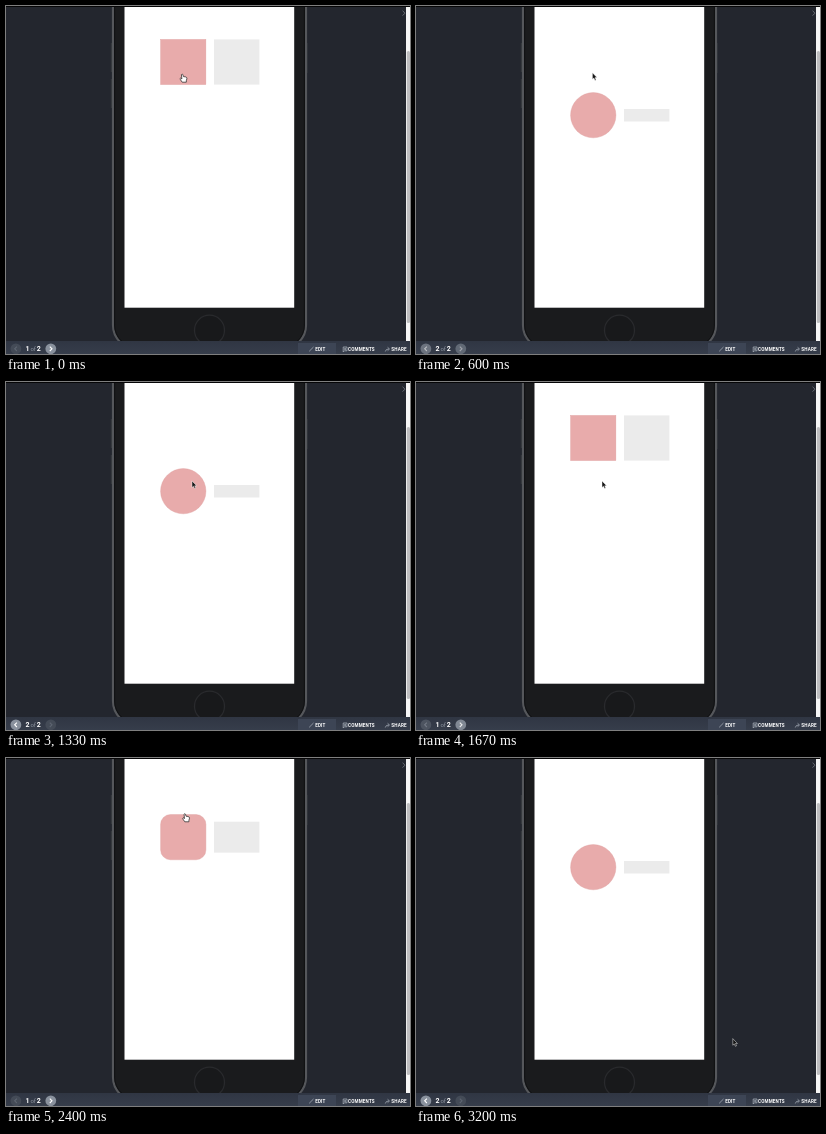
An HTML page for the animation above (3.27 s loop, 404 px wide and 348 px high).

```html
<!DOCTYPE html>
<html lang="en">
<head>
<meta charset="utf-8">
<title>Prototype preview</title>
<style>
  html, body { margin: 0; width: 100%; height: 100%; overflow: hidden; background: #23262e; }
  svg { display: block; width: 100%; height: 100%; }
  text { font-family: Roboto, Arial, sans-serif; font-weight: 700; fill: #fff; }
  .label { font-size: 4.6px; letter-spacing: .15px; }
  .count { font-size: 7px; }
  .icon { fill: none; stroke: #b4bac4; stroke-width: .7; }
</style>
</head>
<body>
<svg viewBox="0 0 404 348">
  <defs>
    <linearGradient id="barFill" x2="0" y2="1">
      <stop offset="0" stop-color="#303643"/>
      <stop offset="1" stop-color="#363d4b"/>
    </linearGradient>
  </defs>
  <rect width="404" height="348" fill="#23262e"/>

  <!-- phone -->
  <g fill="#34373c">
    <rect x="104.8" y="37" width="2" height="29"/>
    <rect x="104.8" y="73" width="2" height="29"/>
    <rect x="300" y="37" width="1.6" height="30"/>
  </g>
  <rect x="107" y="-60" width="193" height="403" rx="24" fill="#1a1b1d" stroke="#55575b" stroke-width="2.2"/>
  <rect x="108.6" y="-60" width="189.8" height="401.4" rx="22.5" fill="none" stroke="#101113"/>
  <rect x="118.5" y="0" width="169.7" height="301.7" fill="#fff"/>
  <circle cx="203.5" cy="324.2" r="15" fill="#18191b" stroke="#292a2d" stroke-width="1.3"/>

  <!-- design -->
  <rect id="pink" x="154.6" width="45.3" height="45.2" fill="#e8abab" stroke="#dfa0a0" stroke-width=".4"/>
  <rect id="grey" x="208" width="45.4" fill="#ebebeb"/>

  <!-- window edges -->
  <rect x="400" width="4" height="335" fill="#f6f6f6"/>
  <rect x="400.8" y="45" width="3.2" height="272" rx="1.5" fill="#bdbdbf"/>
  <path d="M396.6 4.8L399 7.2L396.6 9.6" fill="none" stroke="#71757d" stroke-width=".9"/>
  <rect width="404" height="1" fill="#050506"/>

  <!-- toolbar -->
  <rect y="335" width="404" height="13" fill="url(#barFill)"/>
  <rect x="292" y="337" width="38" height="11" fill="#3d4555"/>
  <g id="prev" transform="translate(9.9 342.8)">
    <circle r="5.4"/><path d="M1 -2.2L-1.2 0L1 2.2" fill="none" stroke-width="1.1"/>
  </g>
  <g id="next" transform="translate(44.8 342.8)">
    <circle r="5.4"/><path d="M-1 -2.2L1.2 0L-1 2.2" fill="none" stroke-width="1.1"/>
  </g>
  <text id="page" class="count" x="19.4" y="345.2">1</text>
  <text x="24.4" y="345.2" style="font-size:6px;font-weight:400;fill:#8b929e">of</text>
  <text class="count" x="30.8" y="345.2">2</text>
  <g class="icon">
    <path d="M303.2 345.3L307.5 341"/>
    <path d="M337.2 341H341V344.8H338.4L337.2 346ZM338.2 342.4H340M338.2 343.6H340"/>
    <path d="M379.3 345.5Q379.8 343 382.6 343M381.6 341.3L383.5 343L381.6 344.7"/>
  </g>
  <text class="label" x="309.2" y="345">EDIT</text>
  <text class="label" x="342" y="345">COMMENTS</text>
  <text class="label" x="385.3" y="345">SHARE</text>

  <!-- cursor -->
  <g id="cursor" stroke-linejoin="round">
    <path id="arrow" d="M.4 .3V6.9L1.9 5.6L3 8L4.1 7.5L3.1 5.2H5Z" fill="#151515" stroke="#fff" stroke-opacity=".75" stroke-width=".6"/>
    <path id="hand" d="M-.6 1.2Q.2 .3 .9 1.2L1.4 3.2L3.6 3.5Q5 3.9 4.9 5.2L4.3 7.4V8.8H.2L-1.6 6.2Q-2.4 4.9 -1.5 4.7L-.1 5.5Z" fill="#fff" stroke="#2a2a2a" stroke-width=".75"/>
  </g>
</svg>
<script>
const LOOP = 3270, TICK = 200 / 3, MORPH = 300, FADE = 340;

// pointer stops: time, x, y
const stops = [
  [0, 176, 67.4], [133, 176, 66.4], [1000, 176, 66.4], [1333, 185.6, 98.6],
  [1667, 185.6, 98.6], [2140, 178.6, 55], [2734, 178.6, 55], [3067, 306.6, 207], [3200, 316.4, 280.3]
];
// page changes: time, page
const pages = [[-FADE, 1], [515, 2], [1500, 1], [2567, 2]];

const $ = id => document.getElementById(id);
const set = (el, attrs) => { for (const k in attrs) el.setAttribute(k, attrs[k]); };
const clamp = v => Math.max(0, Math.min(1, v));
const mix = (a, b, p) => a + (b - a) * p;
const smooth = u => u * u * (3 - 2 * u);
const easeOut = u => 1 - (1 - u) ** 3;
const blend = (a, b, p) => `rgb(${a.map((v, i) => Math.round(mix(v, b[i], p)))})`;

function pointer(t) {
  const i = stops.findIndex(s => s[0] > t);
  if (i < 0) return stops[stops.length - 1].slice(1);
  const [a, b] = [stops[i - 1], stops[i]];
  const p = (t - a[0]) / (b[0] - a[0]);
  return [mix(a[1], b[1], p), mix(a[2], b[2], p)];
}

function button(el, p) {
  el.children[0].setAttribute('fill', blend([68, 75, 87], [137, 145, 157], p));
  el.children[1].setAttribute('stroke', blend([94, 101, 113], [255, 255, 255], p));
}

function draw(time) {
  const t = Math.min(48, Math.floor((time + 4) / TICK)) * TICK;

  // the way back is a hard cut
  const start = t < 1520 ? 235 : 2263;
  const m = smooth(clamp((t - start) / MORPH));
  const top = mix(33.4, 86.6, m);
  set($('pink'), { y: top, rx: 22.65 * m });
  set($('grey'), { y: mix(33.4, 103, m), height: mix(45.2, 12.5, m) });

  const [since, page] = pages.filter(p => p[0] <= t).pop();
  const f = easeOut(clamp((t - since) / FADE));
  const second = page === 2 ? f : 1 - f;
  $('page').textContent = page;
  button($('prev'), second);
  button($('next'), 1 - second);

  const [x, y] = pointer(t);
  const hover = page === 1 && y > top - 5 && y < top + 45;
  set($('cursor'), { transform: `translate(${x} ${y})` });
  set($('hand'), { visibility: hover ? 'visible' : 'hidden' });
  set($('arrow'), { visibility: hover ? 'hidden' : 'visible' });
}

const began = performance.now();
function tick() {
  draw((performance.now() - began) % LOOP);
  requestAnimationFrame(tick);
}
tick();
</script>
</body>
</html>
```
